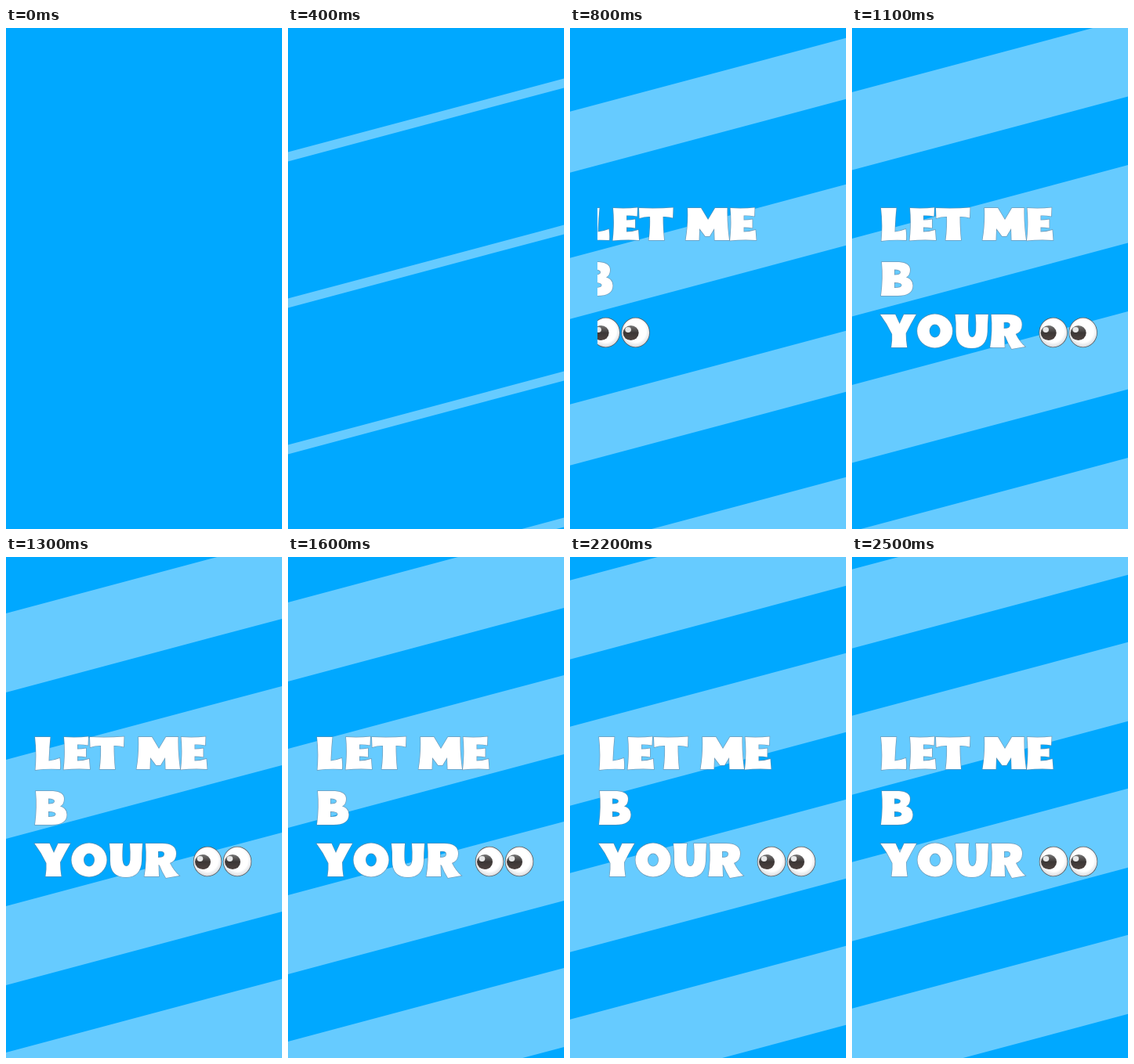
Recreate the animation shown at these times as an HTML page. Size 352 by 640 pixels, loop 2600 ms.

```html
<!DOCTYPE html>
<html lang="en">
<head>
<meta charset="utf-8">
<title>Let me B your 👀</title>
<style>
  html, body { margin: 0; height: 100%; overflow: hidden; background: #00a8ff; }
  svg { display: block; width: 100%; height: 100%; }
  .line { fill: #fff; fill-rule: evenodd; stroke: #74879b; stroke-opacity: .7; stroke-width: 1.4; paint-order: stroke; }
</style>
</head>
<body>
<svg viewBox="0 0 352 640" role="img" aria-label="LET ME B YOUR 👀">
  <defs>
    <clipPath id="wipe"><path d="M35 0H352V640H35Z"/></clipPath>
    <radialGradient id="white" cx=".5" cy=".45" r=".55">
      <stop offset=".7" stop-color="#fff"/><stop offset="1" stop-color="#d9dce0"/>
    </radialGradient>
    <linearGradient id="iris" x1="0" y1="0" x2="0" y2="1">
      <stop offset="0" stop-color="#777"/><stop offset=".5" stop-color="#3c3736"/><stop offset="1" stop-color="#4e4340"/>
    </linearGradient>
    <path id="e" d="M74 230Q90 231 105 229.5L104.5 240.5Q97 239 91 239.5V245.5Q97 245.5 102 244.5V255.5Q97 254.5 91 254.5V260.5Q98 260.5 106 258L107 271Q90 270 73.5 271.5Q76 250 74 230Z"/>
    <g id="eye">
      <ellipse rx="17.5" ry="18.5" fill="url(#white)" stroke="#5b5a5e" stroke-opacity="1" stroke-width="1.5"/>
      <ellipse cx="-6" cy=".5" rx="10" ry="9.5" fill="url(#iris)" stroke="none"/>
      <ellipse cx="-9.5" cy="-3.5" rx="3.8" ry="3.4" fill="#e8e8e8" stroke="none"/>
    </g>
  </defs>
  <path id="stripes" fill="#66cbff"/>
  <g clip-path="url(#wipe)">
    <g class="line">
      <path d="M37 230H56.5Q55 245 54.5 260.5Q61 260 68.5 257Q69.5 264 69 271Q52 270 37.5 272Q39.5 250 37 230Z"/>
      <use href="#e"/>
      <path d="M107 230Q129 231 150.5 229.5L150 242.5Q144 240.5 137.5 241Q137.5 256 139 271H119.500Q121.500 256 121 241Q115 240.5 107.500 243Z"/>
      <path d="M169 230H186L195 245L204 230H219.500Q219 250 222 271H203.500L203 256L197 266H191.500L184 256L183.500 271H166.500Q170 250 169 230Z"/>
      <use href="#e" x="149.5"/>
    </g>
    <g class="line">
      <path d="M38 299H60Q74 300 74 309Q74 316 69 318.5Q77.500 321 77.500 329Q77.500 342 58 342H37Q40 320 38 299ZM54 308.5V315.500Q62 315.500 62 312Q62 308.500 54 308.500ZM54 325V332Q63.500 332 63.500 328.500Q63.500 325 54 325Z"/>
    </g>
    <g class="line">
      <path d="M36.500 366H55.500L61 378L66.500 366H82Q75 378 69 390Q69 399 70.500 408H50.500Q52 399 51.500 391Q45.500 378 36.500 366Z"/>
      <path d="M83.500 387A22.500 21.500 0 0 1 128.500 387A22.500 21.500 0 0 1 83.500 387ZM99 387A7 8.500 0 0 0 113 387A7 8.500 0 0 0 99 387Z"/>
      <path d="M132 366H149Q148 378 148.500 387Q149.500 395 153.500 395Q157.500 395 158.500 387Q159 377 158 366H174Q173 378 173 388Q172 409 153 409Q133 409 133 388Q133.500 377 132 366Z"/>
      <path d="M178 366H199Q217 366 217 379Q217 388 209 391Q214 401 221 407L204 410Q199 402 196 394L194.500 393L195 408H176.500Q180 387 178 366ZM194 376V384Q202 384 202 379.500Q202 375 194 376Z"/>
      <use href="#eye" x="257" y="389"/>
      <use href="#eye" x="295" y="389"/>
    </g>
  </g>
</svg>
<script>
  const LOOP = 2600, STEP = 100;
  const PERIOD = 187, RISE = 94, FULL = 101;   // vertical stripe measures
  const LINE_WIDTHS = [240, 68, 279];
  const stripes = document.getElementById('stripes');
  const lines = document.querySelectorAll('.line');

  function ease(p) {
    p = Math.min(1, Math.max(0, p));
    return p < .5 ? 4 * p ** 3 : 1 - 4 * (1 - p) ** 3;
  }

  function drawStripes(t) {
    const half = FULL / 2 * ease(t / 1300);
    const center = 183.2 - PERIOD * t / 4000;
    let d = '';
    for (let k = -1; k < 5; k++) {
      const top = center + k * PERIOD - half;
      d += `M0 ${top}L352 ${top - RISE}v${2 * half}L0 ${top + 2 * half}Z`;
    }
    stripes.setAttribute('d', half ? d : '');
  }

  function drawLines(t) {
    lines.forEach((line, i) => {
      const shown = ease((t - 395 - 93.5 * i) / 555);
      line.setAttribute('transform', `translate(${(shown - 1) * LINE_WIDTHS[i]} 0)`);
      line.setAttribute('visibility', shown ? 'visible' : 'hidden');
    });
  }

  const start = performance.now();
  function frame(now) {
    const t = Math.floor(Math.max(0, now - start) % LOOP / STEP) * STEP;
    drawStripes(t);
    drawLines(t);
    requestAnimationFrame(frame);
  }
  frame(start);
</script>
</body>
</html>
```
